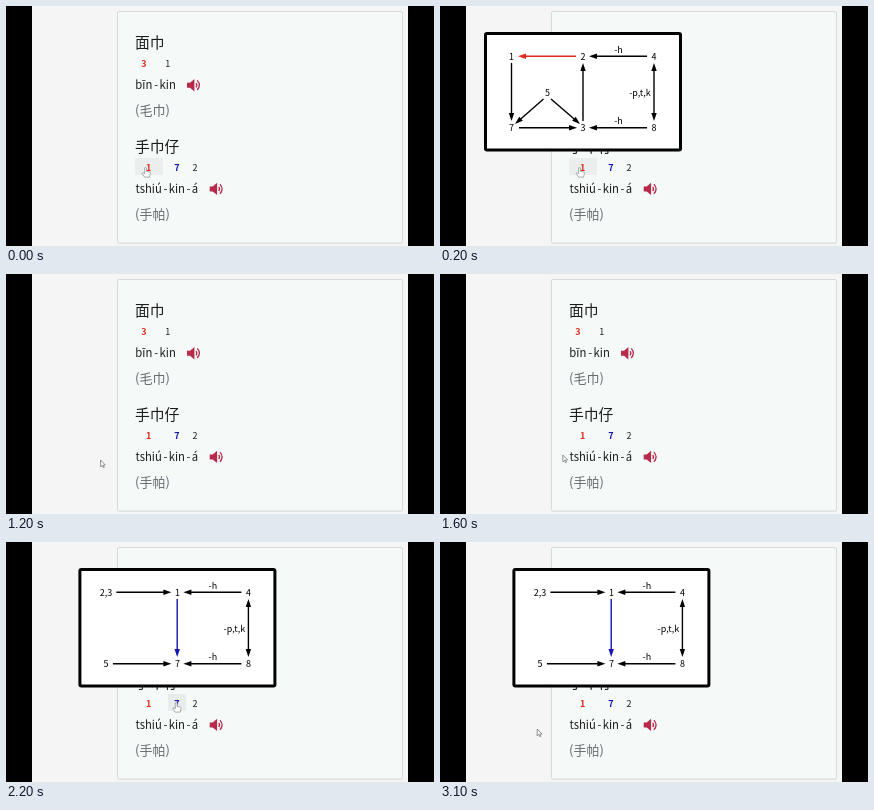
An HTML page for the animation above (3.2 s loop, 428 by 240 pixels).

```html
<!DOCTYPE html>
<html lang="zh-Hant">
<head>
<meta charset="utf-8">
<title>Tone sandhi</title>
<style>
html, body { margin: 0; width: 100%; height: 100%; overflow: hidden; background: #000; }
svg { display: block; width: 100vw; height: 100vh; }
text { font-family: "Noto Sans CJK TC", "Noto Sans CJK JP", "Noto Sans CJK", "Noto Sans", sans-serif; fill: #1c1c1c; }
.word { font-size: 14.8px; }
.gloss { font-size: 13px; fill: #686c70; }
.roman { font-size: 11.3px; }
.tone, .label { font-size: 9px; text-anchor: middle; }
.bold { font-weight: 700; }
</style>
</head>
<body>
<svg id="stage" viewBox="0 0 428 240" xmlns="http://www.w3.org/2000/svg"></svg>
<script>
const RED = '#e02a1c', BLUE = '#1414b4', INK = '#000', LOOP = 3200, STEP = 100;
const stage = document.getElementById('stage');

const rect = (x, y, w, h, fill, more = '') =>
  `<rect x="${x}" y="${y}" width="${w}" height="${h}" fill="${fill}" ${more}/>`;
const text = (x, y, s, cls, fill) =>
  `<text x="${x}" y="${y}" class="${cls}"${fill ? ` style="fill:${fill}"` : ''}>${s}</text>`;
const speaker = (x, y) => `<g transform="translate(${x} ${y})">
  <path d="M0 3.7H3L7.4 0V12.4L3 8.7H0Z" fill="#b72a4c"/>
  <path d="M9 4.1Q10.7 6.2 9 8.3M10.2 1.4Q14.6 6.2 10.2 11" fill="none" stroke="#b72a4c" stroke-width="1.3"/></g>`;

function head(x, y, angle, color) {
  return `<path d="M0 0L-8 -2.7V2.7Z" fill="${color}" transform="translate(${x} ${y}) rotate(${angle})"/>`;
}

function arrow(x1, y1, x2, y2, color = INK, both = false) {
  const a = Math.atan2(y2 - y1, x2 - x1), deg = a * 180 / Math.PI;
  const dx = 5 * Math.cos(a), dy = 5 * Math.sin(a);
  const sx = both ? x1 + dx : x1, sy = both ? y1 + dy : y1;
  return `<path d="M${sx} ${sy}L${x2 - dx} ${y2 - dy}" stroke="${color}" stroke-width="1.4"/>` +
    head(x2, y2, deg, color) + (both ? head(x1, y1, deg + 180, color) : '');
}

const label = (x, y, s) => text(x, y + 3.3, s, 'label', INK);

// Both diagrams share the frame and the right-hand side.
function popup(id, dx, body) {
  return `<g id="${id}" transform="translate(${dx} 0)">
    ${rect(45.5, 27.5, 195, 116.5, '#fff', 'rx="1.5" stroke="#000" stroke-width="3"')}
    ${label(214, 50.5, 4)}${label(214, 122, 8)}
    ${arrow(207, 50.3, 149, 50.3)}${arrow(207, 121.7, 149, 121.7)}
    ${label(178.5, 43.7, '-h')}${label(178.5, 114.7, '-h')}
    ${arrow(214, 57, 214, 115, INK, true)}${label(200, 86.5, '-p,t,k')}
    ${body}</g>`;
}

const diagramA = label(71.5, 50.5, 1) + label(143, 50.5, 2) + label(107.5, 86.3, 5) +
  label(71.5, 122, 7) + label(143, 122, 3) +
  arrow(136, 50.3, 78, 50.3, RED) + arrow(71.5, 57, 71.5, 115) +
  arrow(143, 115, 143, 57) + arrow(79, 121.7, 137, 121.7) +
  arrow(103.5, 93, 75, 118) + arrow(111, 93, 140, 118);

const diagramB = label(71.5, 50.5, '2,3') + label(143, 50.5, 1) +
  label(71.5, 122, 5) + label(143, 122, 7) +
  arrow(82, 50.3, 137, 50.3) + arrow(78.5, 121.7, 137, 121.7) +
  arrow(142.8, 57, 142.8, 115, BLUE);

stage.innerHTML =
  rect(0, 0, 428, 240, '#000') + rect(26, 0, 376, 240, '#f5f5f5') +
  rect(111, 5.6, 286, 232.2, '#e6eae9', 'rx="2"') +
  rect(111.5, 5.5, 285, 231.5, '#f5faf9', 'rx="1.5" stroke="#d3dad9"') +
  rect(129, 152, 28, 17, '#ebeeed', 'id="hot1" rx="1"') +
  rect(162, 152, 18, 17, '#e8ecec', 'id="hot7" rx="1"') +
  text(129, 42.4, '面巾', 'word') +
  text(138, 61, 3, 'tone bold', RED) + text(161.7, 61, 1, 'tone') +
  text(129.3, 83, 'bīn', 'roman') + text(148.3, 83, '-', 'roman') + text(153.6, 83, 'kin', 'roman') +
  speaker(181, 73) + text(129, 109, '(毛巾)', 'gloss') +
  text(129, 146, '手巾仔', 'word') +
  text(142.6, 164.5, 1, 'tone bold', RED) + text(171, 164.5, 7, 'tone bold', BLUE) +
  text(189, 164.5, 2, 'tone') +
  text(129.5, 186.7, 'tshiú', 'roman') + text(157.5, 186.7, '-', 'roman') +
  text(162.7, 186.7, 'kin', 'roman') + text(180.5, 186.7, '-', 'roman') + text(185.8, 186.7, 'á', 'roman') +
  speaker(203.7, 176.7) + text(129, 213, '(手帕)', 'gloss') +
  popup('popA', 0, diagramA) + popup('popB', 28.4, diagramB) +
  `<path id="arrow" d="M0 0V6.8L1.6 5.4L2.7 7.7L3.7 7.2L2.7 5H4.7Z" fill="#fff" stroke="#666" stroke-width=".7"/>
  <path id="hand" d="M-.9 .6Q0 -.5 .9 .6V4L4.3 4.8Q5 5.1 4.8 6.2L4 9.8H-1L-3.3 6.4Q-3.3 5.2 -2.2 5.5L-.9 6.6Z" fill="#fff" stroke="#888" stroke-width=".7"/>`;

const el = id => document.getElementById(id);
const show = (id, on) => el(id).setAttribute('visibility', on ? 'visible' : 'hidden');

const ONE = [139.5, 161.3], SEVEN = [170.2, 160.3], REST = [94.6, 186], END = [97.2, 187];
const moves = [
  { from: 400, to: 600, a: ONE, c: [112, 184], b: REST },
  { from: 1400, to: 1900, a: REST, c: [136, 182], b: SEVEN },
  { from: 2400, to: 3000, a: SEVEN, c: [116, 199], b: END }
];

function cursorAt(t) {
  let pos = ONE;
  for (const { from, to, a, b, c } of moves) {
    if (t < from) break;
    const p = Math.min(1, (t - from) / (to - from));
    const k = p * p * (3 - 2 * p), q = 1 - k;
    pos = a.map((v, i) => q * q * v + 2 * q * k * c[i] + k * k * b[i]);
  }
  return pos;
}

function draw(time) {
  const t = Math.floor(time % LOOP / STEP) * STEP;
  const [x, y] = cursorAt(t);
  const inRow = y > 152 && y < 169;
  const hot1 = inRow && x > 129 && x < 157 && t < 600;
  const hot7 = inRow && x > 162 && x < 180;
  show('hot1', hot1);
  show('hot7', hot7);
  show('popA', t >= 100 && t < 1200);
  show('popB', t >= 2200);
  show('hand', hot1 || hot7);
  show('arrow', !(hot1 || hot7));
  for (const id of ['hand', 'arrow']) el(id).setAttribute('transform', `translate(${x} ${y})`);
}

let start;
function tick(now) {
  start ??= now;
  draw(now - start);
  requestAnimationFrame(tick);
}
draw(0);
requestAnimationFrame(tick);
</script>
</body>
</html>
```
